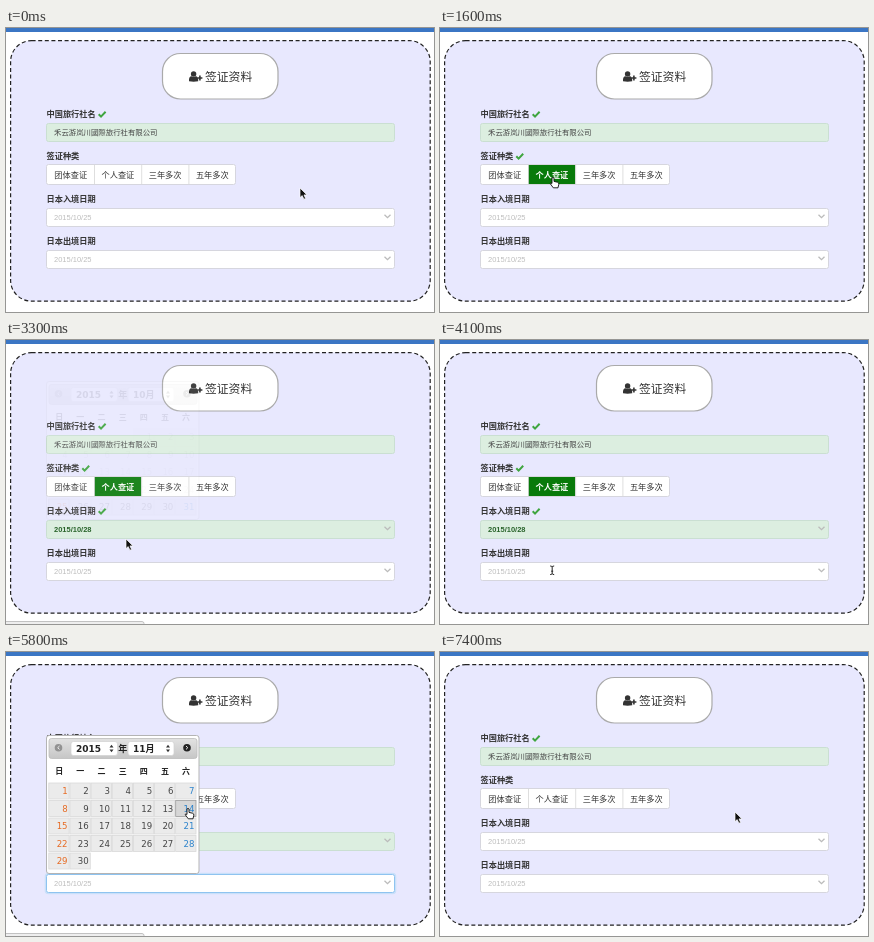
These frames come from a looping animation (428x284 px, 7500 ms). An HTML page:

```html
<!DOCTYPE html>
<html lang="zh">
<head>
<meta charset="utf-8">
<style>
html, body { margin: 0; width: 100%; height: 100%; overflow: hidden; background: #fff; }
svg { display: block; }
text { font-family: "Noto Sans CJK SC", "Noto Sans CJK", sans-serif; white-space: pre; }
text.num { font-family: "Liberation Sans", Arial, sans-serif; }
text.cal { font-family: "DejaVu Sans", "Noto Sans CJK SC", sans-serif; }
</style>
</head>
<body>
<svg id="stage" width="428" height="284" viewBox="0 0 428 284">
  <defs>
    <linearGradient id="head" x2="0" y2="1">
      <stop stop-color="#e2e2e2"/><stop offset="1" stop-color="#c6c6c6"/>
    </linearGradient>
  </defs>
  <g id="view"></g>
</svg>
<script>
const LOOP = 7500;
const PICK = 1300, OPEN1 = 2150, DAY1 = 3100, OPEN2 = 4300, NEXT = 5400, DAY2 = 5850, RESET = 7000;
const FADE = 260;
const view = document.getElementById('view');

// Pointer path: time, x, y
const path = [
  [0, 294, 160], [400, 294, 160], [1200, 113, 149], [1650, 113, 149], [2050, 96, 187],
  [2450, 96, 187], [2900, 119, 167], [3120, 119, 168], [3300, 120, 199], [3600, 120, 199],
  [4150, 112, 231], [4450, 112, 231], [5100, 179, 94], [5420, 179, 94], [5740, 182, 156],
  [5900, 182, 156], [6250, 184, 186], [6450, 184, 186], [7100, 295, 160], [LOOP, 295, 160]
];

const clamp = v => Math.max(0, Math.min(1, v));

function pointer(t) {
  const i = path.findIndex(k => k[0] > t);
  const [t0, x0, y0] = path[i - 1], [t1, x1, y1] = path[i];
  const u = (t - t0) / (t1 - t0), e = u * u * (3 - 2 * u);
  return [x0 + (x1 - x0) * e, y0 + (y1 - y0) * e];
}

const rect = (x, y, w, h, fill, stroke = 'none', r = 0, more = '') =>
  `<rect x="${x}" y="${y}" width="${w}" height="${h}" rx="${r}" fill="${fill}" stroke="${stroke}" ${more}/>`;
const text = (x, y, s, size, fill = '#333', more = '') =>
  `<text x="${x}" y="${y}" font-size="${size}" fill="${fill}" ${more}>${s}</text>`;
const line = (d, stroke, width, more = '') =>
  `<path d="${d}" fill="none" stroke="${stroke}" stroke-width="${width}" ${more}/>`;

const BOLD = 'font-weight="bold"', MID = 'text-anchor="middle"', END = 'text-anchor="end"';
const VALID = '#dceee0', VALID_EDGE = '#cadfd2';

function label(y, s, done) {
  const tick = 41 + s.length * 8.2 + 2.5;
  return text(40.5, y + 3, s, 8.2, '#333', BOLD) +
    (done ? line(`M${tick} ${y + .3}l2.3 2.3l4.6 -4.8`, '#3fa53f', 2) : '');
}

function dateField(y, value, focus, caret) {
  const edge = focus ? '#8ec3f0' : value ? VALID_EDGE : '#d6d6de';
  return (focus ? rect(39.5, y - .5, 350, 20, 'none', '#c9e0f9', 3, 'stroke-width="1.6"') : '') +
    rect(40.5, y + .5, 348, 18, value ? VALID : '#fff', edge, 2) +
    text(48, y + 11.7, value || '2015/10/25', 7.5, value ? '#2b652d' : '#bdbdbd',
      `class="num" ${value ? BOLD : ''}`) +
    (caret ? line(`M48.5 ${y + 5}v9`, '#2b652d', .8) : '') +
    line(`M378.5 ${y + 6.7}l3 3l3 -3`, '#bbb', 1.3);
}

function typeButtons(chosen, hover) {
  let s = rect(40.5, 136.5, 189, 20, '#fff', '#d6d6de', 2);
  ['团体查证', '个人查证', '三年多次', '五年多次'].forEach((name, i) => {
    const x = 41 + i * 47.2, on = chosen && i === 1;
    if (on || hover === i) s += rect(x, 137, 47, 19, on ? '#087a0a' : '#e9e9e9');
    if (i) s += line(`M${x + .3} 137v19`, '#d6d6d6', .8);
    s += text(x + 23.7, 149.6, name, 8.2, on ? '#fff' : '#333', MID + (on ? ' ' + BOLD : ''));
  });
  return s;
}

function select(x, y, w, s) {
  return rect(x, y, w, 14, '#fff', '#d2d2d2', 2.5, 'stroke-width=".7"') +
    text(x + 5, y + 10.3, s, 9, '#222', `class="cal" ${BOLD}`) +
    `<path d="M${x + w - 8} ${y + 6}l2 -2.8l2 2.8zm0 2l2 2.8l2 -2.8z" fill="#333"/>`;
}

function roundArrow(x, y, dir, fill) {
  return `<circle cx="${x}" cy="${y}" r="3.8" fill="${fill}"/>` +
    line(`M${x - dir} ${y - 1.7}l${dir * 1.8} 1.7l${-dir * 1.8} 1.7`, '#eee', 1);
}

// month: number, weekday of the 1st, day count, first selectable day
function calendar(top, [month, first, days, min], opacity, x, y) {
  const onNext = Math.abs(x - 181) < 9 && Math.abs(y - top - 13) < 9;
  let s = rect(40.5, top + .5, 152.5, 138, '#fff', '#b4b4b4', 2.5) +
    rect(43, top + 3.5, 148, 20, 'url(#head)', '#bdbdbd', 2.5, 'stroke-width=".8"') +
    (onNext ? rect(173, top + 5, 16, 15, '#e4e4e4', '#999', 2, 'stroke-width=".8"') : '') +
    roundArrow(52.5, top + 12.7, -1, '#929292') + roundArrow(181, top + 12.7, 1, '#222') +
    select(65, top + 6.5, 46.5, '2015') + text(112.2, top + 17, '年', 9, '#222', BOLD) +
    select(122, top + 6.5, 46, month + '月');
  [...'日一二三四五六'].forEach((d, i) =>
    s += text(53.2 + i * 21.15, top + 39, d, 8, '#222', `${MID} ${BOLD}`));
  for (let d = 1; d <= days; d++) {
    const cell = d + first - 1, col = cell % 7, row = Math.floor(cell / 7);
    const cx = 42.8 + col * 21.15, cy = top + 48 + row * 17.5;
    const active = d >= min, today = active && month === 10 && d === 25;
    const hover = active && x >= cx && x < cx + 20 && y >= cy && y < cy + 17;
    const ink = !active ? '#cbcbcb' : col === 0 ? '#e66a22' : col === 6 ? '#2b82cb' : '#444';
    s += rect(cx, cy, 20.3, 16, active ? hover ? '#d6d6d6' : '#ebebeb' : '#fcfcfc',
      active ? hover || today ? '#999' : '#d9d9d9' : '#f6f6f6', 0, 'stroke-width=".8"');
    s += text(cx + 18.8, cy + 11.2, d, 8.6, ink, `class="cal" ${END}`);
  }
  return `<g opacity="${opacity}">${s}</g>`;
}

const cursors = {
  arrow: '<path d="M0 0v9.6l2.2 -2l1.7 3.6l1.7 -.8l-1.6 -3.5h3z" fill="#111" stroke="#fff" stroke-width=".7"/>',
  hand: '<path d="M-1 1q1 -1.3 2 0v3.4l3.8 .9q1.3 .5 1 2l-.8 3.5h-4.7l-3 -4q-.4 -1.4 1.7 -.4z" fill="#fff" stroke="#111" stroke-width=".9"/>',
  beam: line('M-2 -4.3q2 0 2 1.2v6.2q0 1.2 -2 1.2M2 -4.3q-2 0 -2 1.2M2 4.3q-2 0 -2 -1.2M-1 .9h2', '#222', 1)
};

function cursorKind(t, x, y) {
  const open1 = t > OPEN1 && t < DAY1, open2 = t > OPEN2 && t < DAY2;
  if (open1 && y < 180) return y > 159 ? 'hand' : 'arrow';
  if (open2 && y < 222) return y > (t > NEXT ? 131 : 201) ? 'hand' : 'arrow';
  if (y > 137 && y < 156 && x < 230) return 'hand';
  return y > 180 && y < 198 || y > 222 && y < 240 ? 'beam' : 'arrow';
}

function draw(t) {
  const [x, y] = pointer(t);
  const within = (a, b) => t >= a && t < b;
  const fade = (a, b) => clamp((t - a) / FADE) * clamp(1 - (t - b) / (FADE - 40));
  const focus1 = within(OPEN1, DAY1), focus2 = within(OPEN2, DAY2);
  const blink = a => (t - a) % 1000 < 500;
  const chosen = within(PICK, RESET);
  const date1 = within(DAY1, RESET) && '2015/10/28', date2 = within(DAY2, RESET) && '2015/11/14';
  const kind = cursorKind(t, x, y);
  const hover = kind === 'hand' && y < 157 && t < OPEN1 ? Math.floor((x - 41) / 47.2) : -1;

  let s = rect(0, 0, 428, 4, '#3b76c4') +
    rect(4.6, 12.6, 419.6, 260.6, '#e8e8fe', '#222', 21, 'stroke-width="1.2" stroke-dasharray="4 2.6"') +
    rect(156.5, 25.5, 115.5, 45.5, '#fff', '#aaa', 18, 'stroke-width="1.2"') +
    '<g fill="#333"><circle cx="187.6" cy="46" r="2.7"/>' +
    '<path d="M183 53.3q-.3 -5 2.6 -5q2 1.4 4 0q2.9 0 2.6 5q-4.6 .8 -9.2 0z"/></g>' +
    line('M191.4 50h5M193.9 47.5v5', '#333', 1.6) +
    text(199, 52.6, '签证资料', 11.8) +
    label(86, '中国旅行社名', true) +
    rect(40.5, 95.5, 348, 18, VALID, VALID_EDGE, 2) +
    text(48, 106.8, '禾云游岚川國際旅行社有限公司', 7.4, '#444') +
    label(128, '签证种类', chosen) + typeButtons(chosen, hover) +
    label(171, '日本入境日期', date1) + dateField(180, date1, focus1, focus1 && blink(OPEN1)) +
    label(213, '日本出境日期', date2) + dateField(222, date2, focus2, focus2 && blink(OPEN2));

  const show1 = fade(OPEN1, DAY1), show2 = fade(OPEN2, DAY2);
  if (show1 > 0) s += calendar(41, [10, 4, 31, 25], show1, x, y);
  if (show2 > 0) s += calendar(83, t < NEXT ? [10, 4, 31, 28] : [11, 0, 30, 1], show2, x, y);
  // Link status at the bottom of the window
  if (within(2850, 3600) || within(NEXT + 100, 6800))
    s += rect(-2, 281.5, 140, 6, '#eee', '#b5b5b5', 2, 'stroke-width=".8"');

  view.innerHTML = s + `<g transform="translate(${x} ${y})">${cursors[kind]}</g>`;
}

const start = performance.now();
function tick() {
  draw((performance.now() - start) % LOOP);
  requestAnimationFrame(tick);
}
tick();
</script>
</body>
</html>
```
